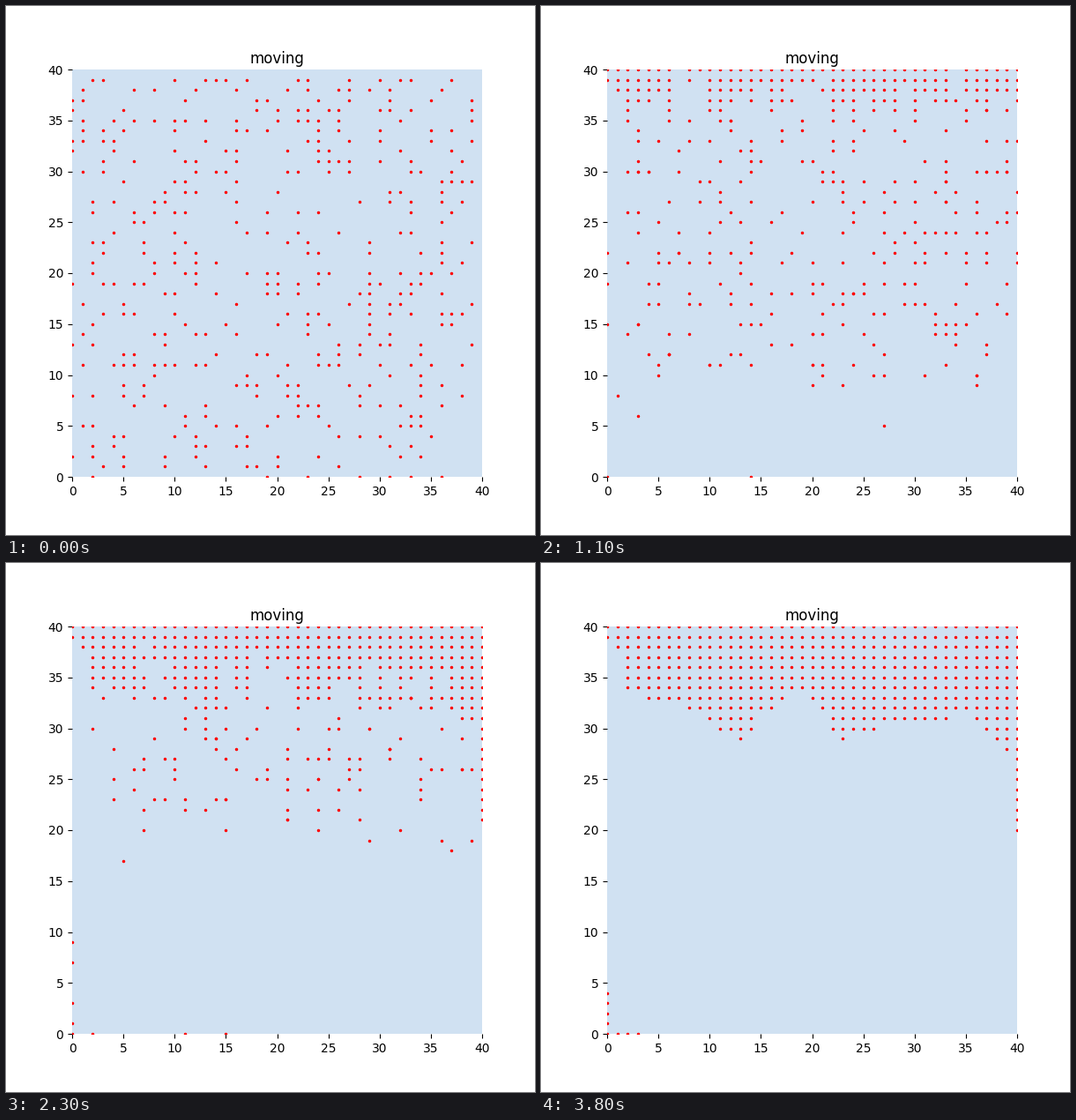
Write a matplotlib script that moves like this. It is 600 px wide and 600 px high and loops after 4100 ms.

```python
import numpy as np
import matplotlib.pyplot as plt
from matplotlib.animation import FuncAnimation

TOP = 40
LAST_STEP = 38
FRAMES = 41
DRIFT = 0.15      # chance per step of sliding one column right
PAUSE = 0.1       # chance per step of standing still

# Outline of the finished pile: (column, lowest row) at its bends.
OUTLINE = [(0, 39), (1, 38), (2, 34), (9, 32), (13, 29), (15, 32), (19, 34),
           (23, 29), (27, 31), (32, 31), (35, 32), (39, 28), (40, 20)]

# Start cells of the few walkers that queue in the lower left corner.
TO_FLOOR = [(9, 11), (25, 11), (34, 20), (38, 16)]
TO_WALL = [(12, 19), (6, 26), (15, 30), (16, 32)]

rng = np.random.default_rng(12)


def pick_starts(col, count, taken):
    """Choose free start cells {row: column} for walkers ending in col."""
    low = max(0, 36 - 9 * col)
    starts = {}
    while len(starts) < count:
        y = int(rng.integers(low, TOP))
        x = col - int(rng.binomial(max(LAST_STEP - y, 1), DRIFT))
        if 0 <= x < TOP and y not in starts and (x, y) not in taken:
            starts[y] = x
            taken.add((x, y))
    return starts


def make_climbers():
    """Return (start row, end column, end row, pauses, hops) per walker."""
    taken = set(TO_FLOOR + TO_WALL)
    edges = np.interp(range(TOP + 1), *zip(*OUTLINE)).round().astype(int)
    climbers = []
    for col, edge in enumerate(edges):
        starts = pick_starts(col, TOP + 1 - edge, taken)
        delay = {y: int(rng.binomial(TOP - y, PAUSE)) for y in starts}
        order = sorted(starts, key=lambda y: delay[y] - y)
        for row, y in zip(range(TOP, -1, -1), order):
            wait = max(0, min(delay[y], LAST_STEP - (row - y)))
            arrival = max(1, row - y + wait)
            pauses = rng.permutation(np.arange(1, arrival))[:wait]
            hops = rng.integers(1, arrival + 1, size=col - starts[y])
            climbers.append((y, col, row, pauses, hops))
    return climbers


def make_corner():
    """Return (start cell, end cell) pairs, queued in order of arrival."""
    floor = [(start, (k, 0)) for k, start in enumerate(TO_FLOOR)]
    wall = [(start, (0, k + 1)) for k, start in enumerate(TO_WALL)]
    return floor + wall


CLIMBERS = make_climbers()
CORNER = make_corner()


def positions(t):
    xs, ys = [], []
    for y, col, row, pauses, hops in CLIMBERS:
        xs.append(col - np.sum(hops > t))
        ys.append(min(row, y + t - np.sum(pauses <= t)))
    for (x0, y0), (x1, y1) in CORNER:
        xs.append(max(x1, x0 - t))
        ys.append(max(y1, y0 - t))
    return xs, ys


fig, ax = plt.subplots(figsize=(6, 6), dpi=100)
fig.subplots_adjust(left=0.125, right=0.9, bottom=0.11, top=0.88)
ax.set_facecolor("#d0e1f2")
ticks = range(0, TOP + 1, 5)
ax.set(xlim=(0, TOP), ylim=(0, TOP), xticks=ticks, yticks=ticks)
ax.set_title("moving", pad=5)
ax.spines[:].set_visible(False)
dots, = ax.plot([], [], ".", color="red", markersize=3)


def update(frame):
    dots.set_data(*positions(min(frame, LAST_STEP)))
    return dots,


anim = FuncAnimation(fig, update, frames=FRAMES, interval=100,
                     repeat=True, repeat_delay=0)
plt.show()
```
